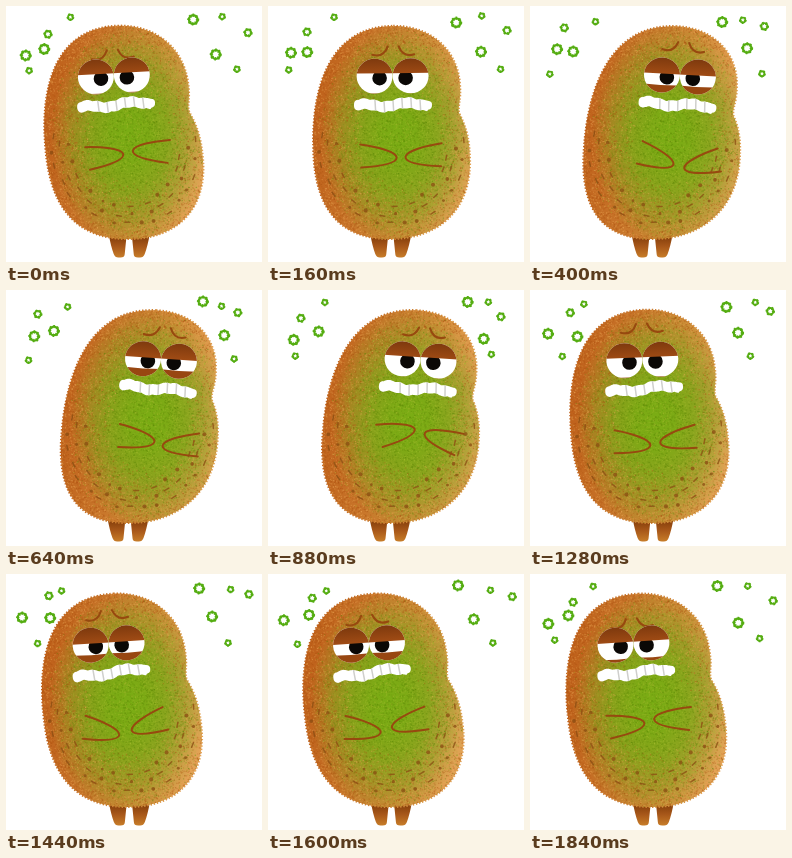
An HTML page with a canvas for the animation above (1.92 s loop, 256 by 256 pixels).

```html
<!DOCTYPE html>
<html lang="en">
<head>
<meta charset="utf-8">
<title>Queasy kiwi</title>
<style>
  html, body { margin: 0; width: 100%; height: 100%; overflow: hidden; background: #fff; }
  canvas { display: block; width: 100vmin; height: 100vmin; }
</style>
</head>
<body>
<canvas width="256" height="256"></canvas>
<script>
const canvas = document.querySelector('canvas');
const ctx = canvas.getContext('2d');
const LOOP = 1920, STEP = 80, RAD = Math.PI / 180;
const BROWN = '#984711', LINE = '#97490f', RING = '#55ad12', SPOT = '#8a4c12';

const wave = deg => Math.cos(deg * RAD);
const clamp = v => Math.min(1, Math.max(0, v));
const smooth = v => v * v * (3 - 2 * v);

let seed = 7;
function rnd() {
  seed = (seed * 16807) % 2147483647;
  return seed / 2147483647;
}

// Everything follows the loop angle: a sway that lingers at both ends,
// and two cramps per loop for the eyes, arms and brows
function poseAt(a) {
  const sway = wave(a - 125);
  return {
    lean: sway * (1.45 - .45 * sway * sway),
    squint: Math.max(.08, smooth(clamp(.5 + .25 * wave(a - 20) + .6 * wave(2 * (a - 108))))),
    arm: 3 + 6 * wave(a) + 13 * wave(2 * (a - 87)),
    grin: 7 * wave(a - 118) - 2,
    brow: 5.5 + 3.5 * wave(a) + 3 * wave(2 * (a - 155))
  };
}

// Rings come in pairs, one per cluster, with evenly spread phases
const RINGS = [
  { r: 2.5, spots: [[60, 14], [226.5, 66]] },
  { r: 4.3, spots: [[22, 46.5], [212, 45.5]] },
  { r: 4.3, spots: [[44.5, 43.5], [193.5, 14]] },
  { r: 2.5, spots: [[26, 67], [219, 13]] },
  { r: 3.2, spots: [[38, 25], [238, 23.5]] }
];

const grain = Array.from({ length: 13000 }, () => {
  const x = 40 + rnd() * 170, y = 16 + rnd() * 220;
  const e = Math.hypot((x - 132) / 80, (y - 130) / 108) + (rnd() - .5) * .6;
  const dark = rnd() < .5;
  const hue = e > .72 ? (dark ? '170,80,16' : '232,165,84')
                      : (dark ? '92,134,8' : '164,186,48');
  return { x, y, fill: `rgba(${hue},${.2 + rnd() * .3})` };
});

// Dots and dashes along the lower rim
const freckles = [];
for (let row = 0; row < 3; row++) {
  for (let a = row * 5 - 6; a < 190; a += 12 + row * 2) {
    const ang = (a + rnd() * 6) * RAD, out = 70 - row * 9 + rnd() * 4;
    freckles.push({
      x: 125 + out * Math.cos(ang),
      y: 142 + (out + 4) * Math.sin(ang),
      ang: ang + Math.PI / 2,
      len: rnd() < .4 ? 5 : 0,
      r: 1.4 + rnd() * .7
    });
  }
}

function warp(x, y, lean) {
  const h = (232 - y) / 212;
  return [x + 22 * lean * Math.max(h, 0), y + lean * .05 * (x - 122) * h];
}

function bodyPath(lean) {
  const p = (x, y) => warp(x, y, lean);
  const curve = (a, b, c, d, e, f) => ctx.bezierCurveTo(...p(a, b), ...p(c, d), ...p(e, f));
  ctx.beginPath();
  ctx.moveTo(...p(128, 20));
  curve(166, 20, 193, 45, 194, 80);
  curve(195, 96, 191, 100, 193, 108);
  curve(200, 121, 203, 135, 203, 155);
  curve(203, 203, 172, 233, 122, 233);
  curve(80, 233, 46, 212, 46.5, 140);
  curve(46, 80, 65, 20, 128, 20);
  ctx.closePath();
}

function group(x, y, deg, draw) {
  ctx.save();
  ctx.translate(x, y);
  ctx.rotate(deg * RAD);
  draw();
  ctx.restore();
}

function disc(x, y, r, fill) {
  ctx.beginPath();
  ctx.arc(x, y, r, 0, 2 * Math.PI);
  ctx.fillStyle = fill;
  ctx.fill();
}

function stroke(color, width) {
  ctx.strokeStyle = color;
  ctx.lineWidth = width;
  ctx.stroke();
}

// A dashed overlay gives lines a ragged crayon edge
function ragged(color, width) {
  ctx.save();
  ctx.lineCap = 'butt';
  ctx.setLineDash([1.4, 1.8]);
  stroke(color, width);
  ctx.restore();
}

function gradient(g, ...colors) {
  colors.forEach((c, i) => g.addColorStop(i / (colors.length - 1), c));
  return g;
}

function drawFeet(lean) {
  const fill = gradient(ctx.createLinearGradient(0, 231, 0, 251), '#86400c', '#a9591a', '#c67b28');
  for (const side of [-1, 1]) {
    ctx.save();
    ctx.translate(122.7 - lean * .7, 0);
    ctx.scale(side, 1);
    ctx.beginPath();
    ctx.moveTo(2.5, 228);
    ctx.lineTo(20.5, 228);
    ctx.quadraticCurveTo(18.5, 240, 15.5, 248);
    ctx.quadraticCurveTo(14, 252, 10, 251.5);
    ctx.quadraticCurveTo(4.5, 252, 4.5, 248);
    ctx.closePath();
    ctx.fillStyle = fill;
    ctx.fill();
    ctx.restore();
  }
}

function drawBody(lean) {
  const left = 46 + 8 * lean;
  const skin = gradient(ctx.createLinearGradient(left, 110, left + 156, 130),
    '#bf611b', '#c8752a', '#d28a38', '#e2a356');
  ctx.save();
  bodyPath(lean);
  ragged(skin, 2.2);
  ctx.clip();
  ctx.fillStyle = skin;
  ctx.fillRect(0, 0, 256, 256);
  ctx.save();
  ctx.translate(132 + 11 * lean, 130);
  ctx.scale(.76, 1.07);
  ctx.fillStyle = gradient(ctx.createRadialGradient(0, 0, 0, 0, 0, 104),
    'rgba(122,173,20,1)', 'rgba(122,171,20,.97)', 'rgba(126,168,24,.85)',
    'rgba(130,164,30,.5)', 'rgba(140,160,40,0)');
  ctx.fillRect(-200, -200, 400, 400);
  ctx.restore();

  for (const s of grain) {
    const [x, y] = warp(s.x, s.y, lean);
    ctx.fillStyle = s.fill;
    ctx.fillRect(x, y, 1.2, 1.2);
  }
  ctx.globalAlpha = .75;
  for (const f of freckles) {
    const [x, y] = warp(f.x, f.y, lean);
    if (f.len) {
      const dx = Math.cos(f.ang) * f.len / 2, dy = Math.sin(f.ang) * f.len / 2;
      ctx.beginPath();
      ctx.moveTo(x - dx, y - dy);
      ctx.lineTo(x + dx, y + dy);
      stroke(SPOT, 1.5);
    } else {
      disc(x, y, f.r, SPOT);
    }
  }
  ctx.restore();
}

function drawArm(x, y, side, deg) {
  group(x, y, side * deg, () => {
    ctx.scale(side, 1);
    ctx.beginPath();
    ctx.moveTo(-1, -11.5);
    ctx.bezierCurveTo(15, -10, 35, -6, 36, 0);
    ctx.bezierCurveTo(36, 7, 15, 10, 1, 11.5);
    stroke(LINE, 2);
  });
}

function drawEye(x, squint, look) {
  ctx.save();
  ctx.translate(x, 0);
  ctx.beginPath();
  ctx.ellipse(0, 0, 18, 17.5, 0, 0, 2 * Math.PI);
  ctx.clip();
  ctx.fillStyle = '#fff';
  ctx.fillRect(-20, -20, 40, 40);
  disc(look, 2, 7.3, '#0b0806');
  ctx.fillStyle = gradient(ctx.createLinearGradient(0, -17, 0, 0), '#7f3a0e', '#a34d15');
  ctx.fillRect(-20, -20, 40, 17 + squint * 1.5);
  const low = 17.5 - 8.5 * squint;
  ctx.beginPath();
  ctx.moveTo(-20, low);
  ctx.quadraticCurveTo(0, low + 1.5, 20, low);
  ctx.lineTo(20, 20);
  ctx.lineTo(-20, 20);
  ctx.fillStyle = BROWN;
  ctx.fill();
  ctx.restore();
}

function drawBrows() {
  for (const side of [-1, 1]) {
    ctx.beginPath();
    ctx.moveTo(side * 5.5, -4.5);
    ctx.quadraticCurveTo(side * 10, 7, side * 21, 3.5);
    stroke(LINE, 2.1);
  }
}

function drawMouth() {
  const mid = x => 1.7 * Math.sin(x * .15 + 2.8);
  const bump = x => 1.2 * Math.abs(Math.sin(x * .27));
  const end = mid(37);
  ctx.beginPath();
  for (let x = -35; x <= 35; x++) ctx.lineTo(x, mid(x) - 4.6 - bump(x));
  ctx.quadraticCurveTo(39.5, end - 4, 39, end);
  ctx.quadraticCurveTo(39, end + 4, 35, end + 4.6);
  for (let x = 34; x >= -35; x--) ctx.lineTo(x, mid(x) + 4.6 + bump(x + 5));
  ctx.quadraticCurveTo(-39.5, mid(-35) + 5, -39, mid(-35));
  ctx.quadraticCurveTo(-39, mid(-35) - 4.5, -35, mid(-35) - 5);
  ctx.closePath();
  ctx.fillStyle = '#fff';
  ctx.fill();
  ctx.save();
  ctx.clip();
  for (let x = -18; x < 36; x += 9) {
    ctx.beginPath();
    ctx.moveTo(x, -9);
    ctx.lineTo(x + .6, 9);
    stroke('#cfcfcc', 1.5);
  }
  ctx.restore();
}

function drawRings(a) {
  RINGS.forEach(({ r, spots }, i) => {
    const dx = 6.3 * wave(a - 45 - 66 * i);
    const dy = 3.3 * wave(2 * (a - 105 - 62 * i));
    for (const [x, y] of spots) {
      ctx.beginPath();
      ctx.arc(x + dx, y + dy, r, 0, 2 * Math.PI);
      stroke(RING, .9 + r * .32);
      ragged(RING, 1.9 + r * .36);
    }
  });
}

function draw(t) {
  const a = t / LOOP * 360;
  const { lean, squint, arm, grin, brow } = poseAt(a);

  ctx.fillStyle = '#fff';
  ctx.fillRect(0, 0, 256, 256);
  ctx.lineCap = ctx.lineJoin = 'round';
  drawRings(a);
  drawFeet(lean);
  drawBody(lean);
  drawArm(95 + 18 * lean, 149.5 - 4 * lean, 1, arm + 4 * lean);
  drawArm(175.5 + 17 * lean, 149.5 + 5.5 * lean, -1, arm - 4 * lean);
  group(129 + 30 * lean, 37.5 + brow, 5 * lean, drawBrows);
  group(128 + 27 * lean, 70, 4 * lean, () => {
    drawEye(-18, squint, 5);
    drawEye(18, squint, -5);
  });
  group(128 + 24 * lean, 98.8, grin, drawMouth);
}

let shown = -1;
function tick() {
  const t = Math.floor(performance.now() % LOOP / STEP) * STEP;
  if (t !== shown) draw(shown = t);
  requestAnimationFrame(tick);
}
tick();
</script>
</body>
</html>
```
